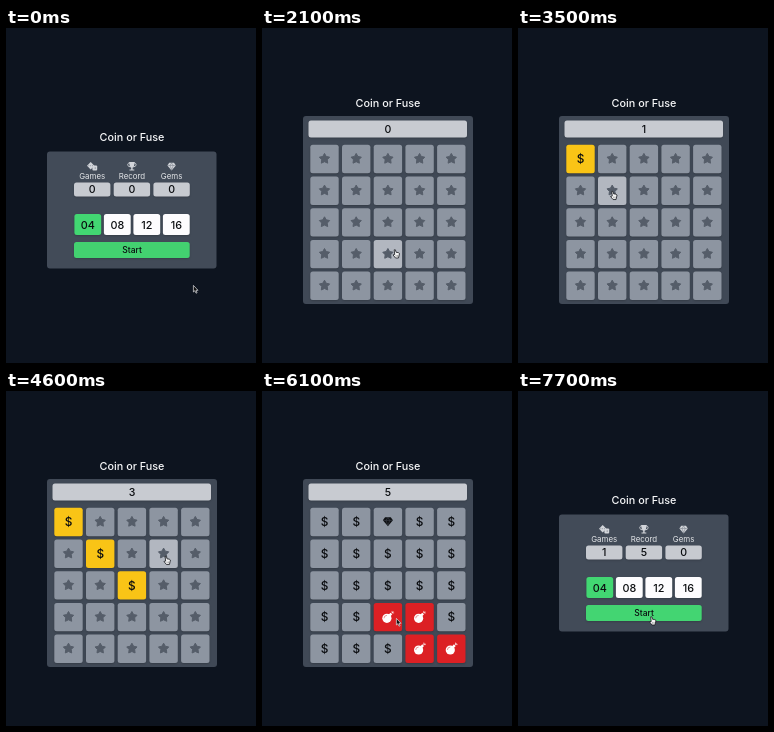
Animation of 250 by 335 pixels, one loop 8 s. Source, as an HTML page with a canvas:

```html
<!DOCTYPE html>
<html lang="en">
<head>
<meta charset="utf-8">
<title>Coin or Fuse</title>
<style>
html, body { margin: 0; width: 100%; height: 100%; overflow: hidden; background: #0d141f; }
canvas { display: block; width: 250px; height: 335px; }
</style>
</head>
<body>
<canvas id="stage"></canvas>
<script>
const canvas = document.getElementById('stage');
const c = canvas.getContext('2d');
const W = 250, H = 335, MID = 126, LOOP = 8000, STEP = 100;
const BOARD_IN = 2100, FIRST_PICK = 3200, PICK_GAP = 500, PICKS = 5;
const LOST = FIRST_PICK + PICKS * PICK_GAP, BOARD_OUT = 6800, HAND_BACK = 7200;
const CELL = 28.4, PITCH = 31.7, TAU = Math.PI * 2;
const scale = window.devicePixelRatio || 1;
canvas.width = W * scale;
canvas.height = H * scale;

const GREY = [141, 149, 161], LIT = [178, 183, 192], GOLD = [249, 196, 22], RED = [220, 32, 36];
const ICON = '#d2d5da', DETAIL = '#59616d', INK = '#0b0d10';

const clamp = v => Math.max(0, Math.min(1, v));
const mix = (a, b, k) => a.map((v, i) => v + (b[i] - v) * k);
const rgb = a => `rgb(${a.map(Math.round).join()})`;
const easeOut = k => 1 - (1 - k) ** 2;
const inside = ([px, py], x, y, w, h) => px >= x && px < x + w && py >= y && py < y + h;
const corner = (col, row) => [48.3 + col * PITCH, 116.8 + row * PITCH];

// Picks run down the diagonal to the middle column and back up.
const pickRow = col => 2 - Math.abs(2 - col);
const pickTime = col => FIRST_PICK + col * PICK_GAP;
const isPick = (col, row) => row === pickRow(col);
const isBomb = (col, row) => row > 2 && (col === row || col === row - 1);

// Cursor stops: arrival time, x, y
const stops = [
  [0, 187, 257], [200, 109, 199], [700, 177, 203], [1100, 80, 195],
  [1300, 80, 195], [1500, 133.5, 222], [2700, 90, 156]
];
for (let col = 0; col < PICKS; col++) {
  const [x, y] = corner(col, pickRow(col));
  stops.push([pickTime(col) - STEP, x + CELL * .6, y + CELL * .6]);
}
stops.push([LOST, 134, 227], [7400, 134, 226]);

function cursorAt(t) {
  const next = stops.findIndex(s => s[0] > t);
  if (next < 0) return stops.at(-1).slice(1);
  const [from, ...a] = stops[next - 1], [to, ...b] = stops[next];
  const travel = Math.min(to - from, 400);
  return mix(a, b, easeOut(clamp(1 - (to - t) / travel)));
}

function box(x, y, w, h, r, fill) {
  c.fillStyle = fill;
  c.beginPath();
  c.roundRect(x, y, w, h, r);
  c.fill();
}

function raised(x, y, w, h, fill) {
  c.save();
  c.shadowColor = 'rgba(0,0,0,.18)';
  c.shadowBlur = 2 * scale;
  c.shadowOffsetY = scale;
  box(x, y, w, h, 2.5, fill);
  c.restore();
}

function text(str, x, y, size, fill = INK, weight = 500) {
  c.font = `${weight} ${size}px Inter, sans-serif`;
  c.textAlign = 'center';
  c.fillStyle = fill;
  c.fillText(str, x, y);
}

const title = y => text('Coin or Fuse', MID, y, 10.8, '#f6f7f8');

function disc(x, y, r, fill) {
  c.fillStyle = fill;
  c.beginPath();
  c.arc(x, y, r, 0, TAU);
  c.fill();
}

// SVG path drawn around a point
function shape(x, y, d, fill, stroke, width = .7, k = 1) {
  const path = new Path2D(d);
  c.save();
  c.translate(x, y);
  c.scale(k, k);
  c.lineJoin = 'round';
  c.lineWidth = width;
  if (fill) {
    c.fillStyle = fill;
    c.fill(path);
  }
  if (stroke) {
    c.strokeStyle = stroke;
    c.stroke(path);
  }
  c.restore();
}

const starPath = 'M' + Array.from({ length: 10 }, (_, i) => {
  const a = i * TAU / 10 - TAU / 4, r = i % 2 ? 2.9 : 5.4;
  return `${r * Math.cos(a)} ${r * Math.sin(a)}`;
}).join('L') + 'Z';
const star = (x, y) => shape(x, y, starPath, '#555d69', '#555d69', 1);

function gem(x, y, k, fill, facet) {
  shape(x, y, 'M-3-4.5H3L5.3-1.2 0 5-5.3-1.2Z', fill, null, 0, k);
  shape(x, y, 'M-5-1.2H5M-2-1.2L0-4.3 2-1.2 0 4.3Z', null, facet, .5, k);
}

function bomb(x, y) {
  disc(x - 1, y + 1.2, 4.6, '#fff');
  shape(x, y, 'M1.5-1.5L3.5-3.6', null, '#fff', 2.4);
  shape(x, y, 'M4.2-4.2v-2m0 2h2m-2 0l1.3-1.3', null, '#fff', .7);
  shape(x, y, 'M-3.9 1.2A2.9 2.9 0 0 1-1-1.7', null, '#dc6a6c');
}

function dice(x, y) {
  box(x + .2, y - 1, 4.8, 5, 1, ICON);
  disc(x + 3, y + 1.6, .6, DETAIL);
  shape(x - 1.5, y - .6, 'M0-3.8L3.7 0 0 3.8-3.7 0Z', ICON);
  for (let i = -1; i <= 1; i++) disc(x - 1.5 + i * 1.8, y - .6, .45, DETAIL);
}

function trophy(x, y) {
  c.beginPath();
  c.ellipse(x, y - 1.7, 4.2, 2.2, 0, 0, TAU);
  c.strokeStyle = ICON;
  c.lineWidth = .9;
  c.stroke();
  shape(x, y, 'M-2.7-4.3H2.7Q2.7 1.4 0 1.4T-2.7-4.3ZM-.7 1H.7V3.2H2.4v1H-2.4v-1H-.7Z', ICON);
}

function drawCursor([x, y], hand) {
  if (hand) {
    shape(x - 3, y - 1, 'M1.7.8H2.9L3.6 3.3 5.8 3.6 7 4.5 6 9H3L.5 5.9 2.2 5.5Z', '#f4f4f4', '#16191e', .8);
    shape(x - 3, y - 1, 'M3.6 6v1.8M5 6v1.8', null, '#444', .4);
  } else {
    shape(x, y, 'M.4.4V7L1.9 5.7 3 8.2 4.1 7.7 3 5.3H5Z', '#111', '#e4e6e8');
  }
}

function drawMenu(t, cursor) {
  const left = 68, width = 115.7, results = t >= BOARD_OUT ? [1, PICKS, 0] : [0, 0, 0];
  let hand = false;
  title(113);
  box(41, 123.6, 169.5, 117, 3, '#424b58');

  ['Games', 'Record', 'Gems'].forEach((label, i) => {
    const x = 86.2 + i * 39.7;
    [dice, trophy, (gx, gy) => gem(gx, gy, .8, ICON, DETAIL)][i](x, 138.4);
    text(label, x, 151.3, 7.9, '#e3e5e8', 400);
    raised(x - 18.2, 154.5, 36.4, 14, '#c7cad0');
    text(results[i], x, 165.3, 10.6);
  });

  ['04', '08', '12', '16'].forEach((label, i) => {
    const size = 26.8, x = left + .4 + i * 29.5;
    raised(x, 186, size, 21, i ? '#fdfcfe' : '#42d772');
    text(label, x + size / 2, 200.6, 10.8);
    hand ||= inside(cursor, x, 186, size, 21);
  });

  const over = inside(cursor, left, 214, width, 16);
  raised(left, 214, width, 16, over ? '#43d572' : '#43d170');
  text('Start', MID, 225.3, 8.5);
  return hand || over;
}

// Hover glow lingers briefly after the cursor leaves.
function glowAt(t, x, y) {
  for (let k = 0; k < 4; k++) {
    const past = t - k * STEP;
    if (past >= BOARD_IN && inside(cursorAt(past), x, y, CELL, CELL)) return 1 - k / 4;
  }
  return 0;
}

function drawCell(t, col, row) {
  const [x, y] = corner(col, row), cx = x + CELL / 2, cy = y + CELL / 2;
  const lost = t >= LOST, mine = isBomb(col, row);
  const opened = isPick(col, row) && t >= pickTime(col);

  let color = mix(GREY, LIT, glowAt(t, x, y));
  if (opened) color = mix(color, GOLD, clamp((t - pickTime(col) + STEP) / 200));
  if (lost) color = mix(color, mine ? RED : GREY, clamp((t - LOST + STEP) / 400));
  raised(x, y, CELL, CELL, rgb(color));

  if (lost && mine) bomb(cx, cy);
  else if (lost && col === 2 && row === 0) gem(cx, cy - .5, .95, '#0d0f12', '#4a5059');
  else if (lost || opened) text('$', cx, cy + 4.3, 11.8);
  else star(cx, cy - .2);
}

function drawBoard(t, cursor) {
  let score = 0, hand = false;
  for (let col = 0; col < PICKS; col++) score += t >= pickTime(col);
  title(78.5);
  box(41, 88, 170, 188, 3, '#404956');
  raised(46.5, 92.5, 158.5, 17, '#c8cbd1');
  text(score, MID, 105, 10.6);

  for (let row = 0; row < 5; row++) for (let col = 0; col < 5; col++) {
    drawCell(t, col, row);
    hand ||= inside(cursor, ...corner(col, row), CELL, CELL);
  }
  return hand;
}

function draw(now) {
  const t = Math.floor(now % LOOP / STEP) * STEP;
  const cursor = cursorAt(t);
  const playing = t >= BOARD_IN && t < BOARD_OUT;
  c.setTransform(scale, 0, 0, scale, 0, 0);
  c.fillStyle = '#0d141f';
  c.fillRect(0, 0, W, H);
  const hand = (playing ? drawBoard : drawMenu)(t, cursor);
  drawCursor(cursor, hand && (t < LOST || t >= HAND_BACK));
}

const start = performance.now();
function tick() {
  draw(performance.now() - start);
  requestAnimationFrame(tick);
}
tick();
</script>
</body>
</html>
```
